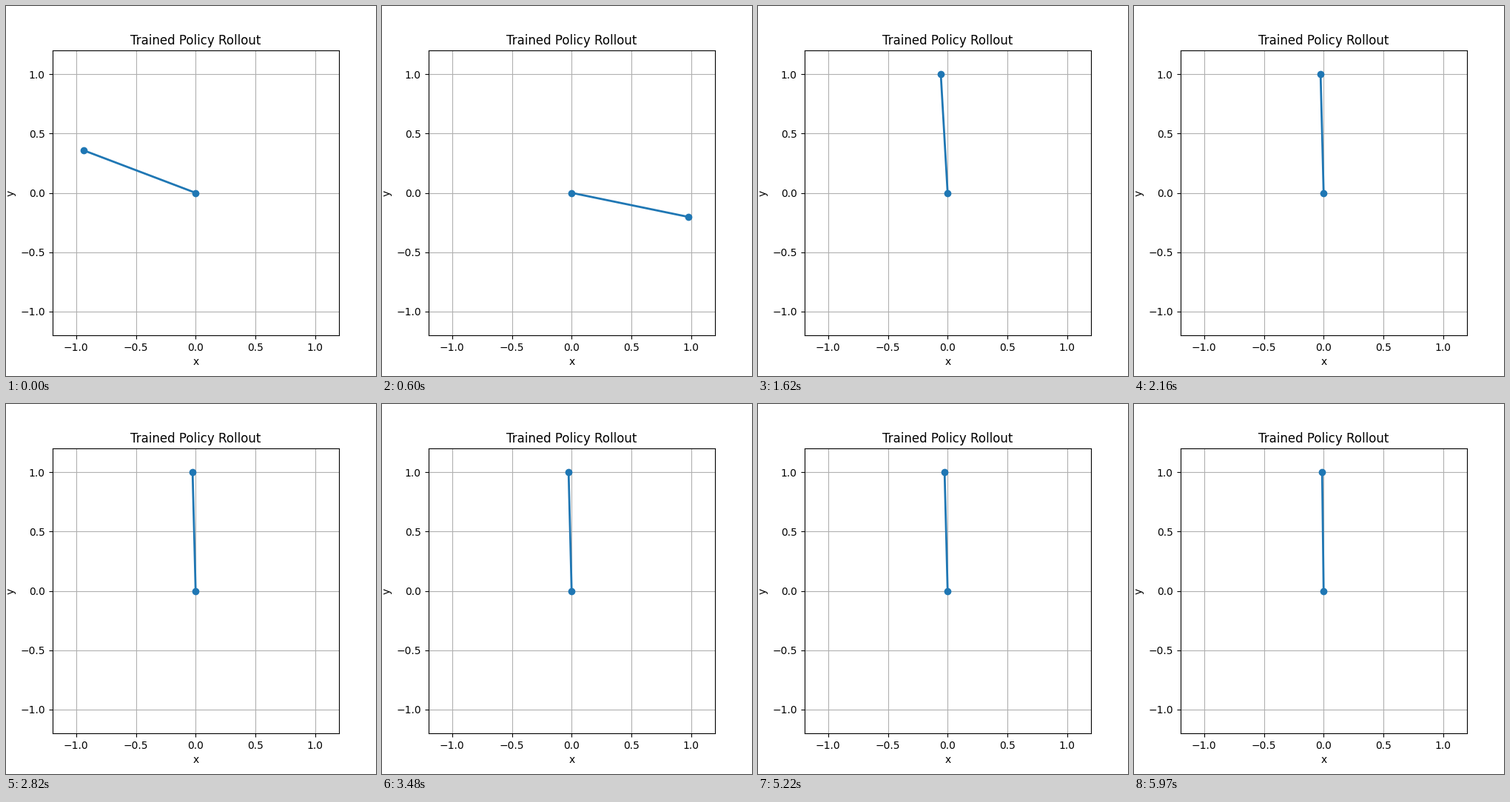
Animation, 500 px wide and 500 px high, one loop 6000 ms. Source, as a matplotlib script:

```python
import numpy as np
import matplotlib.pyplot as plt
from matplotlib.animation import FuncAnimation

FRAMES = 200
INTERVAL = 30
SWAY = 0.0065

# Swing-up poses: step, angle from upright (counterclockwise), speed per step
POSES = [
    (0, 1.206, 0), (8.7, 2.0, 0.185), (15.5, 3.6, 0.2565),
    (20, 4.508, 0.14), (26.45, 4.95, 0), (33.15, 4.0, -0.28),
    (39, 2.138, -0.3025), (42, 1.318, -0.235), (49.3, 0.3, -0.069),
    (57, 0.008, 0), (61, 0.019, 0),
]


def hermite(start, end, n):
    (t0, a0, v0), (t1, a1, v1) = start, end
    h = t1 - t0
    s = (n - t0) / h
    ease = s * s * (3 - 2 * s)
    return (a0 + (a1 - a0) * ease
            + h * s * (1 - s) * (v0 * (1 - s) - v1 * s))


def angle(n):
    for start, end in zip(POSES, POSES[1:]):
        if n < end[0]:
            return hermite(start, end, n)
    # Balanced: the torque flips sign on every step
    return POSES[-1][1] + SWAY * (-1) ** n


def update(n):
    a = angle(n)
    pole.set_data([0, -np.sin(a)], [0, np.cos(a)])
    return (pole,)


fig, ax = plt.subplots(figsize=(5, 5), dpi=100)
ax.set(xlim=(-1.2, 1.2), ylim=(-1.2, 1.2), xlabel="x", ylabel="y",
       title="Trained Policy Rollout")
ax.grid(True)
pole, = ax.plot([], [], "o-", lw=2)

anim = FuncAnimation(fig, update, frames=FRAMES, interval=INTERVAL,
                     init_func=lambda: update(0), repeat=True, repeat_delay=0)
plt.show()
```
